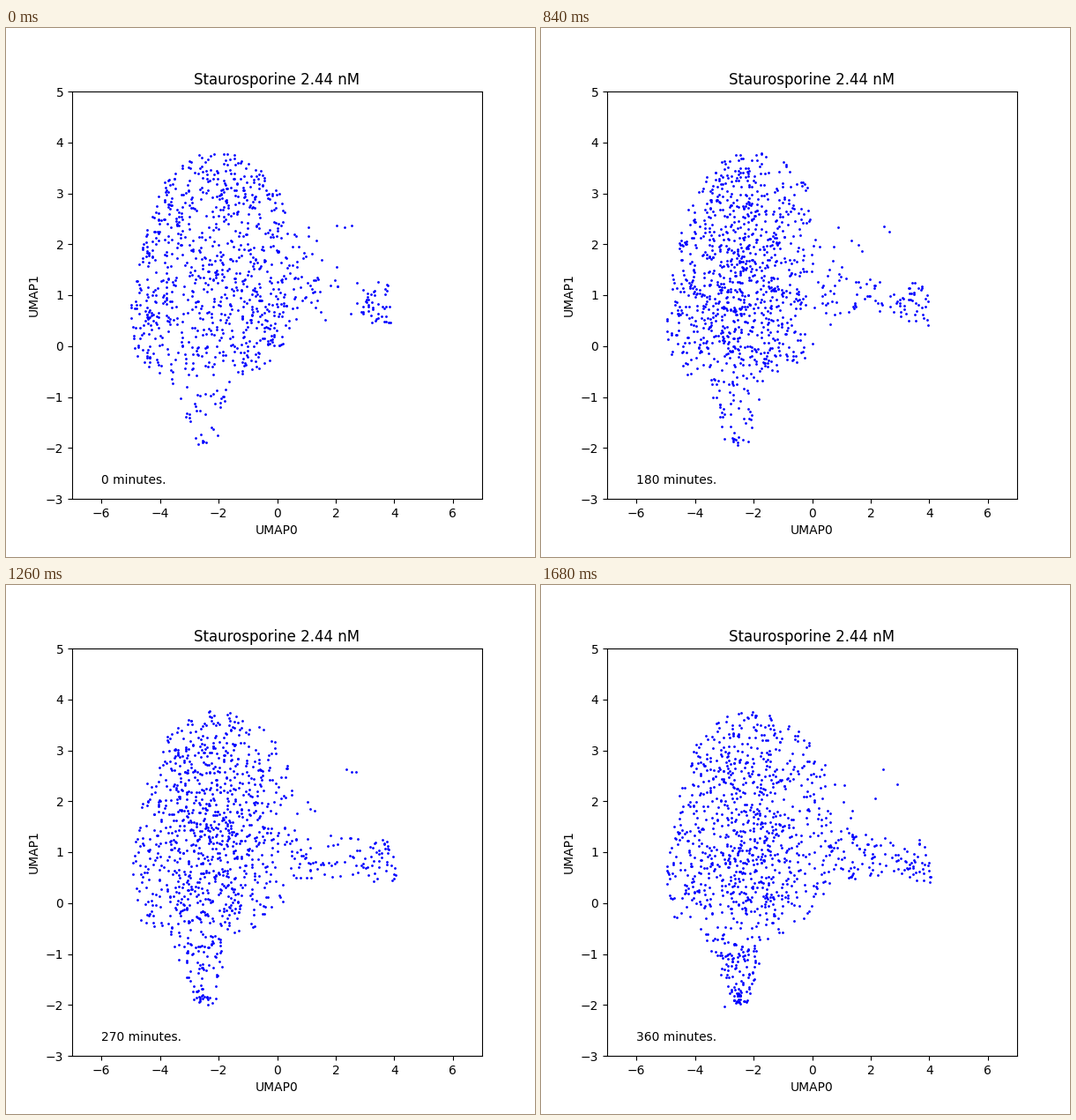
Recreate the animation shown at these times as a matplotlib script. Size 600 by 600 pixels, loop 1820 ms.

```python
import numpy as np
import matplotlib.pyplot as plt
from matplotlib.animation import FuncAnimation
from matplotlib.path import Path

FRAMES, INTERVAL, STEP = 13, 140, 30

# Outlines of the parts of the cloud
BODY = Path([(-5.05, 0.7), (-4.5, 2.3), (-3.9, 3.2), (-2.9, 3.75), (-1.5, 3.8),
             (-0.4, 3.4), (0.8, 2.6), (2.3, 1.4), (2.0, 0.6), (0.5, 0.25),
             (-0.4, -0.4), (-1.8, -0.9), (-4.1, -0.85), (-4.9, -0.1)])
NECK = Path([(0.2, 1.5), (3.0, 1.25), (3.0, 0.6), (0.4, 0.4)])
HEAD = Path([(2.7, 0.7), (3.4, 1.35), (3.85, 1.2), (4.17, 0.38), (3.3, 0.42)])
TAIL = Path([(-3.7, -0.6), (-1.6, -0.6), (-2.0, -1.6), (-2.6, -2.0), (-3.0, -1.7)])
STRAY = Path([(1.4, 2.0), (3.2, 1.8), (2.7, 3.0)])


def sigmoid(x):
    return 1 / (1 + np.exp(-x))


def fill(rng, path, n, density=None):
    """Draw n random points inside path, thinned by density (0 to 1)."""
    low, high = path.vertices.min(axis=0), path.vertices.max(axis=0)
    pts = rng.uniform(low, high, (n * 16 + 50, 2))
    pts = pts[path.contains_points(pts)]
    if density is not None:
        pts = pts[rng.random(len(pts)) < density(*pts.T)]
    return pts[:n]


def cloud(i):
    rng = np.random.default_rng(i)
    t = i / (FRAMES - 1)
    peak = min(1.3, 9 * t - 0.4)
    center = 0.5 * t - 2.75
    edge = 0.4 * np.cos(2 * np.pi * t)

    def density(x, y):
        bump = np.exp(-((x - center) / 1.5) ** 2 - ((y - 1.1) / 1.9) ** 2)
        right = 0.12 + 0.88 * sigmoid((edge - x) / 0.35)
        bottom = sigmoid((y + 0.5) / 0.12)
        return (1 + peak * bump) * right * bottom / (1 + max(peak, 0))

    return np.vstack([
        fill(rng, BODY, int(890 + 80 * np.sin(np.pi * t)), density),
        fill(rng, NECK, int(16 + 50 * t)),
        fill(rng, HEAD, 42),
        fill(rng, TAIL, int(32 + 75 * t ** 2)),
        fill(rng, STRAY, 3),
        rng.normal((-2.5, -1.87), (0.17, 0.07), (int(5 + 20 * t ** 2), 2)),
    ])


fig, ax = plt.subplots(figsize=(6, 6), dpi=100)
ax.set(xlim=(-7, 7), ylim=(-3, 5), xlabel="UMAP0", ylabel="UMAP1",
       title="Staurosporine 2.44 nM")
dots, = ax.plot([], [], "b.", markersize=2)
label = ax.text(-6, -2.7, "")


def update(i):
    dots.set_data(*cloud(i).T)
    label.set_text(f"{i * STEP} minutes.")
    return dots, label


anim = FuncAnimation(fig, update, frames=FRAMES, interval=INTERVAL,
                     repeat=True, repeat_delay=0)
plt.show()
```
